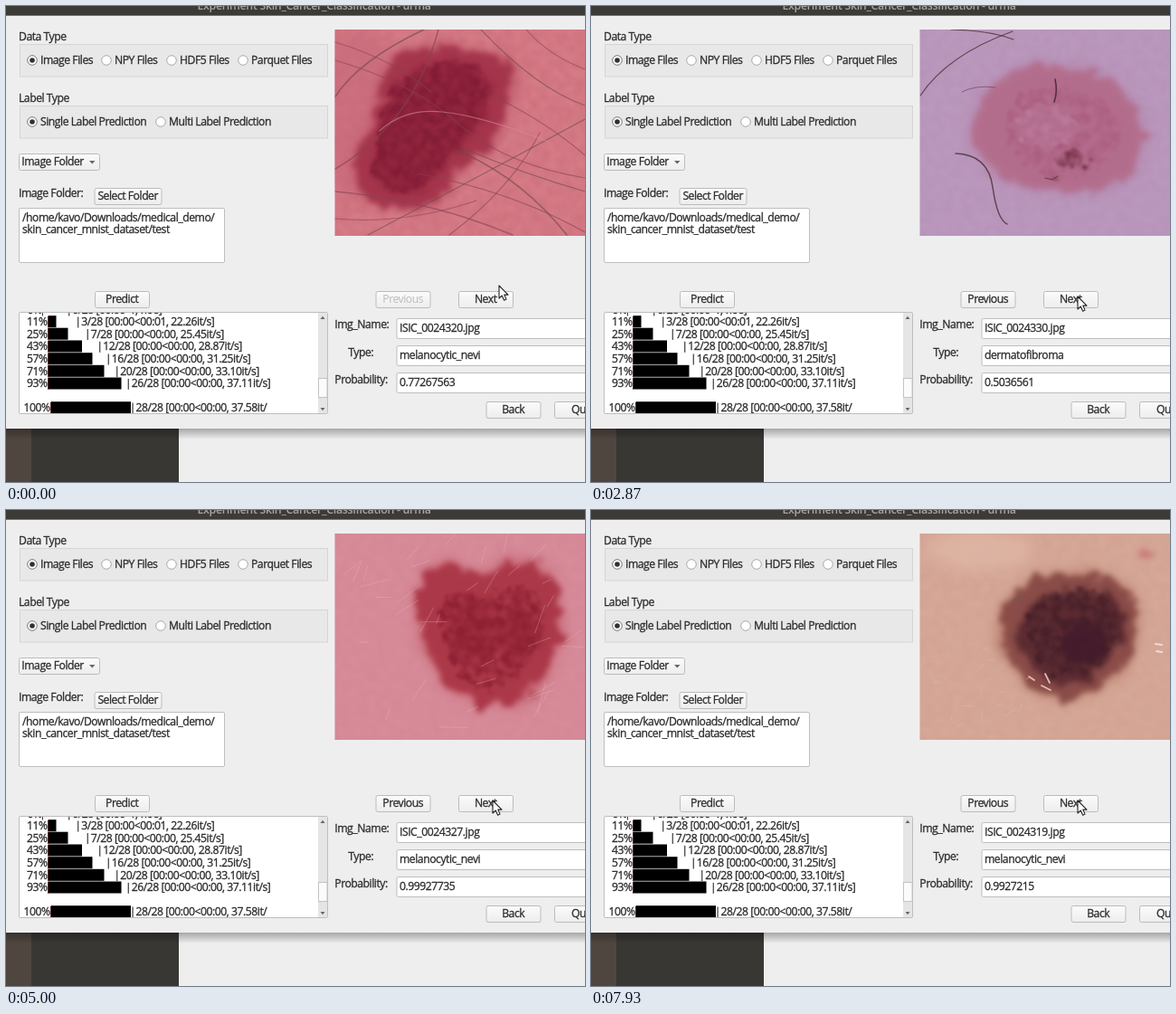
Animation of 640x526 px, one loop 8000 ms. Source, as an HTML page:

```html
<!DOCTYPE html>
<html lang="en">
<head>
<meta charset="utf-8">
<title>Skin lesion prediction</title>
<style>
html, body { margin: 0; width: 100%; height: 100%; overflow: hidden; background: #efeeef; }
svg { display: block; width: 100vw; height: 100vh; }
text {
  font: 12.2px "Open Sans", "Noto Sans", sans-serif; letter-spacing: -.47px; white-space: pre;
  fill: #2c2c2c; stroke: #2c2c2c; stroke-width: .3px;
}
.mid { text-anchor: middle; }
.end { text-anchor: end; }
.off { fill: #bcbbbc; stroke: none; }
.title { font-weight: 600; font-size: 12.4px; letter-spacing: -.3px; fill: #aaa69e; stroke: none; }
.hair { fill: none; stroke-linecap: round; }
</style>
</head>
<body>
<svg id="stage" viewBox="0 0 640 526" preserveAspectRatio="none" xmlns="http://www.w3.org/2000/svg">
  <defs>
    <clipPath id="photoClip"><rect x="363.5" y="26" width="277" height="228"/></clipPath>
    <clipPath id="logClip"><rect x="15" y="339" width="330" height="111"/></clipPath>
    <linearGradient id="shade" x2="0" y2="1">
      <stop stop-color="#000" stop-opacity=".3"/><stop offset="1" stop-color="#000" stop-opacity="0"/>
    </linearGradient>
    <linearGradient id="face" x2="0" y2="1">
      <stop stop-color="#fbfbfb"/><stop offset="1" stop-color="#ededed"/>
    </linearGradient>
    <g id="filters"></g>
  </defs>
  <g id="back"></g>
  <g id="photos" clip-path="url(#photoClip)"></g>
  <g id="front"></g>
  <path id="cursor" d="M0 0V14L3.3 11L5.6 16.2L8 15.1L5.8 10.1H10Z" fill="#fff" stroke="#222" stroke-width="1.1" stroke-linejoin="round"/>
</svg>
<script>
const NS = "http://www.w3.org/2000/svg";
const $ = id => document.getElementById(id);
const LOOP = 8000;

function add(parent, tag, attrs, label) {
  const el = document.createElementNS(NS, tag);
  for (const k in attrs) el.setAttribute(k, attrs[k]);
  if (label !== undefined) el.textContent = label;
  parent.appendChild(el);
  return el;
}
const back = $("back"), front = $("front");
const box = (x, y, width, height, fill, extra = {}) =>
  add(back, "rect", { x, y, width, height, fill, ...extra });
const say = (x, y, label, cls = "", parent = front) =>
  add(parent, "text", { x, y, class: cls }, label);

// Soft organic filters: "edge" and "halo" roughen outlines, "mottle" also breaks the fill up.
function makeFilter(id, freq, scale, blur, patchy) {
  const f = add($("filters"), "filter", {
    id, filterUnits: "userSpaceOnUse", x: 330, y: -10, width: 350, height: 300,
    "color-interpolation-filters": "sRGB"
  });
  add(f, "feTurbulence", { type: "fractalNoise", baseFrequency: freq, numOctaves: 3, seed: 7, result: "n" });
  add(f, "feDisplacementMap", {
    in: "SourceGraphic", in2: "n", scale, xChannelSelector: "R", yChannelSelector: "G", result: "d"
  });
  if (patchy) {
    add(f, "feColorMatrix", { in: "n", values: "0 0 0 0 0  0 0 0 0 0  0 0 0 0 0  2.6 0 0 0 -.8", result: "a" });
    add(f, "feComposite", { in: "d", in2: "a", operator: "in" });
  }
  add(f, "feGaussianBlur", { stdDeviation: blur });
}
makeFilter("edge", .06, 26, 3);
makeFilter("halo", .03, 20, 8);
makeFilter("mottle", .1, 22, 1.4, true);

// Closed smooth curve through the midpoints of a few corner points.
function smooth(pts) {
  const n = pts.length / 2;
  const at = i => [pts[2 * (i % n)], pts[2 * (i % n) + 1]];
  const mid = i => { const a = at(i), b = at(i + 1); return [(a[0] + b[0]) / 2, (a[1] + b[1]) / 2]; };
  let d = "M" + mid(0);
  for (let i = 1; i <= n; i++) d += "Q" + at(i) + " " + mid(i);
  return d + "Z";
}

function random(seed) {
  return () => (seed = (seed * 16807) % 2147483647) / 2147483647;
}

function photo(light, dark) {
  const g = add($("photos"), "g", { display: "none" });
  const rect = (fill, extra) => add(g, "rect", { x: 345, y: 5, width: 320, height: 270, fill, ...extra });
  rect(light);
  rect(dark, { filter: "url(#mottle)", opacity: .25 });
  const api = {
    g,
    blob(pts, fill, filter = "edge", opacity = 1) {
      add(g, "path", { d: smooth(pts), fill, opacity, filter: `url(#${filter})` });
      return api;
    },
    spot(cx, cy, rx, ry, fill, filter = "edge", opacity = 1) {
      add(g, "ellipse", { cx, cy, rx, ry, fill, opacity, filter: `url(#${filter})` });
      return api;
    },
    hair(d, stroke, width = 1.2, opacity = .85) {
      add(g, "path", { class: "hair", d, stroke, "stroke-width": width, opacity });
      return api;
    },
    streaks(seed, count, cx, cy, w, h, stroke, length, angle, spread) {
      const r = random(seed);
      let d = "";
      for (let i = 0; i < count; i++) {
        const a = angle + (r() - .5) * spread, l = length * (.4 + r());
        const x = cx + (r() - .5) * w, y = cy + (r() - .5) * h;
        d += `M${x.toFixed(1)} ${y.toFixed(1)}l${(l * Math.cos(a)).toFixed(1)} ${(l * Math.sin(a)).toFixed(1)}`;
      }
      return api.hair(d, stroke, .8, .4);
    }
  };
  return api;
}

function hairyMole() {
  const shape = [420, 58, 480, 40, 562, 62, 558, 110, 540, 155, 505, 172, 475, 222, 400, 224, 382, 165, 412, 120];
  const p = photo("#d67c87", "#b95a6a");
  p.spot(390, 120, 45, 95, "#c7687a", "halo", .6)
    .blob(shape, "#b94f62", "halo").blob(shape, "#a23249", "edge", .9)
    .blob([430, 75, 525, 55, 540, 110, 490, 165, 465, 205, 405, 205, 410, 135], "#851b35", "edge", .55)
    .blob([430, 75, 525, 55, 540, 110, 490, 165, 465, 205, 405, 205, 410, 135], "#771530", "mottle", .6);
  const lines = [
    "M364 100Q390 60 462 26", "M364 60Q450 85 500 130T640 190", "M364 235Q440 242 520 215",
    "M400 253Q520 190 640 125", "M364 180Q450 130 478 26", "M455 185Q560 205 640 250",
    "M500 155Q570 185 640 205", "M540 100Q600 130 640 165", "M364 205Q470 215 560 253",
    "M525 26Q585 90 640 110", "M575 26Q600 55 640 70", "M490 253Q560 200 590 140",
    "M500 160Q570 190 620 253", "M364 40Q430 60 470 95"
  ];
  lines.forEach((d, i) => p.hair(d, i % 3 ? "#854452" : "#6b4a46", i % 4 ? 1.1 : 1.6, .6));
  return p.hair("M413 138Q440 113 482 117T600 150", "#d08a98", 1.2, .6);
}

function diagonalMole() {
  const shape = [395, 198, 440, 150, 500, 82, 555, 68, 632, 106, 605, 158, 545, 200, 475, 226, 400, 228];
  const core = [425, 190, 475, 150, 515, 85, 560, 76, 612, 108, 580, 158, 535, 190, 460, 212];
  return photo("#e89dad", "#de8fa0")
    .spot(590, 42, 90, 25, "#f0aab8", "halo", .7)
    .blob(shape, "#d27480", "halo").blob(shape, "#cb6670", "edge", .75)
    .blob(core, "#b84a55", "edge", .7).blob(core, "#a4343f", "mottle", .65)
    .spot(549, 106, 20, 11, "#932b37", "edge", .7).spot(480, 180, 20, 13, "#9c323c", "edge", .6)
    .streaks(31, 60, 510, 155, 170, 100, "#a8434d", 15, -.6, 1.5)
    .spot(537, 216, 4, 4, "#a34858", "edge", .7);
}

function lilacPatch() {
  const shape = [424, 105, 470, 66, 535, 64, 590, 90, 616, 140, 602, 192, 545, 208, 480, 204, 424, 168];
  return photo("#bb98bd", "#ad88b0")
    .blob(shape, "#b482a6", "halo").blob(shape, "#b36a88", "edge", .85)
    .blob([455, 110, 500, 85, 570, 100, 595, 150, 540, 198, 465, 170], "#a7567a", "mottle", .6)
    .spot(505, 133, 35, 24, "#c085a6", "mottle", .7)
    .spot(528, 168, 15, 9, "#78354a", "mottle").spot(551, 174, 7, 4, "#703244", "mottle")
    .spot(510, 190, 9, 3, "#763848", "mottle")
    .hair("M364 99Q394 54 466 28", "#51343e").hair("M398 26Q440 27 467 37", "#51343e")
    .hair("M403 163Q439 164 444 200T460 241", "#51343e", 1.5)
    .hair("M410 95Q425 87 447 90", "#6c4457", .8)
    .hair("M513 81Q516 94 512 106", "#432532", 1.6).hair("M502 190l8 2 6-4", "#5a3040", 1);
}

function pinkPatch() {
  const shape = [422, 58, 490, 44, 545, 56, 608, 50, 616, 110, 602, 165, 616, 208, 550, 238, 500, 208, 420, 203, 416, 125];
  return photo("#c49bca", "#b88dbd")
    .blob(shape, "#c98da9", "halo", .8).blob(shape, "#c68299", "edge", .85)
    .blob(shape, "#b86f80", "mottle", .55)
    .spot(527, 132, 27, 34, "#a5719b", "edge", .8)
    .spot(581, 93, 22, 30, "#9b5867", "edge").spot(580, 88, 18, 23, "#673444", "mottle")
    .spot(438, 122, 9, 12, "#9a5264", "mottle").spot(485, 184, 22, 8, "#b5686a", "mottle")
    .hair("M549 26V61", "#62435a").hair("M570 112Q580 132 596 146", "#4d2937", 1.4)
    .hair("M466 193Q462 219 447 247", "#785063").hair("M442 80Q450 105 438 128", "#874859", 1)
    .hair("M370 251Q375 234 390 234Q388 244 376 246", "#73516e", 1);
}

function heartMole() {
  const shape = [454, 76, 480, 54, 525, 74, 558, 58, 598, 58, 617, 115, 610, 164, 575, 209, 535, 221, 488, 199, 460, 145];
  return photo("#d88c9a", "#cc7d8c")
    .blob(shape, "#c35e6c", "halo").blob(shape, "#ab3848")
    .blob([475, 90, 530, 95, 585, 80, 600, 125, 570, 185, 525, 203, 485, 165], "#8a1d30", "mottle", .85)
    .spot(515, 130, 25, 35, "#8c2033", "edge", .5).spot(565, 137, 22, 30, "#8c2033", "edge", .5)
    .streaks(83, 36, 495, 140, 255, 215, "#ecb9c4", 25, -.65, 1.4);
}

function paleCentre() {
  const p = photo("#d99a94", "#cb8880")
    .spot(515, 125, 84, 86, "#b87569", "halo", .8)
    .spot(514, 125, 68, 74, "#a2605a", "halo")
    .spot(517, 120, 59, 62, "#944d5c", "mottle", .8)
    .spot(515, 125, 42, 47, "#a5607a", "edge", .8)
    .spot(510, 128, 27, 35, "#c78bae", "mottle");
  const r = random(19);
  let d = "";
  for (let i = 0; i < 38; i++) {
    const a = r() * 6.28, l = 18 + r() * 28;
    const x = 511 + 7 * Math.cos(a), y = 130 + 9 * Math.sin(a);
    d += `M${x} ${y}L${511 + l * Math.cos(a)} ${130 + l * Math.sin(a)}`;
  }
  return p.hair(d, "#d5a0c6", 1, .45);
}

function darkMole() {
  const shape = [456, 103, 488, 77, 535, 68, 595, 80, 608, 124, 590, 174, 550, 204, 508, 216, 473, 182, 451, 145];
  return photo("#d6a898", "#ca9889")
    .spot(430, 45, 60, 22, "#e1b9a8", "halo", .7)
    .blob(shape, "#b27564", "halo").blob(shape, "#8a4c48")
    .blob([472, 110, 525, 82, 582, 95, 593, 130, 560, 185, 510, 197, 473, 155], "#57282f", "edge", .9)
    .blob([470, 115, 525, 85, 585, 95, 585, 165, 515, 198], "#3c1a25", "mottle", .65)
    .spot(546, 148, 27, 23, "#421a2c", "edge", .8)
    .spot(615, 50, 6, 5, "#c76e70", "edge", .8)
    .hair("M464 103Q470 96 478 95", "#775853", 1.3)
    .hair("M624 148l7 1M625 156l6 1", "#f8e6df", 2)
    .hair("M484 184l6 4M502 181l5 10M498 194l10 5", "#edd2ca", 1.8)
    .streaks(47, 18, 430, 195, 110, 90, "#e8c7ba", 8, -.5, 2);
}

const NEVI = "melanocytic_nevi", FIBROMA = "dermatofibroma";
const scenes = [
  { from: 0, draw: hairyMole, id: 20, type: NEVI, prob: "0.77267563" },
  { from: 870, draw: diagonalMole, id: 11, type: NEVI, prob: "0.9960624" },
  { from: 2870, draw: lilacPatch, id: 30, type: FIBROMA, prob: "0.5036561" },
  { from: 3740, draw: pinkPatch, id: 12, type: "benign_keratosis_like_lesions", prob: "0.9563977" },
  { from: 4600, draw: heartMole, id: 27, type: NEVI, prob: "0.99927735" },
  { from: 6540, draw: paleCentre, id: 18, type: FIBROMA, prob: "1.0" },
  { from: 7400, draw: darkMole, id: 19, type: NEVI, prob: "0.9927215" }
];
scenes.forEach(s => s.layer = s.draw().g);

function button(x, y, w, label, h = 18) {
  box(x + .5, y + .5, w - 1, h, "url(#face)", { rx: 2, stroke: "#bdbcbd" });
  return say(x + w / 2 - .3, y + 13.3, label, "mid");
}

function radio(x, y, label, on) {
  add(front, "circle", { cx: x, cy: y, r: 5.3, fill: "#fff", stroke: on ? "#777" : "#aaa" });
  if (on) add(front, "circle", { cx: x, cy: y, r: 2.8, fill: "#303030" });
  say(x + 9, y + 4.2, label);
}

const field = (x, y, w, h) => box(x + .5, y + .5, w, h, "#fff", { rx: 1.5, stroke: "#bfbebf" });

// Window and desktop
box(0, 0, 640, 526, "#efeeef");
box(0, 467, 28, 59, "#4f4640");
box(28, 467, 163, 59, "#393734");
box(0, 467, 640, 12, "url(#shade)");
box(0, 0, 640, 10, "#3d3b37");
box(0, 10, 640, 1, "#77756f");
say(340.5, 3.5, "Experiment Skin_Cancer_Classification - urma", "title mid");

// Options
for (const y of [42.5, 110.5]) box(15.5, y, 340, 35.5, "#e9e8e9", { stroke: "#d6d5d6" });
say(14, 37.5, "Data Type");
radio(29, 60, "Image Files", true);
radio(111, 60, "NPY Files");
radio(183, 60, "HDF5 Files");
radio(262, 60, "Parquet Files");
say(14, 105.7, "Label Type");
radio(29, 128, "Single Label Prediction", true);
radio(171, 128, "Multi Label Prediction");
button(14, 163, 90, "");
say(17.3, 176.3, "Image Folder");
add(front, "path", { d: "M92 171h6.5l-3.2 3.6z", fill: "#666" });
say(14, 211, "Image Folder:");
button(97.5, 201, 75, "Select Folder");
field(14, 223, 227, 60);
say(18, 237.5, "/home/kavo/Downloads/medical_demo/");
say(18, 250.7, "skin_cancer_mnist_dataset/test");
button(98, 315, 61, "Predict");
const previous = button(408.5, 315, 61, "Previous");
button(500, 315, 61, "Next");
button(530.5, 437, 61, "Back");
button(606, 437, 61, "Quit");

// Log
field(14, 338, 341, 112);
box(345, 339, 10, 111, "#e6e5e6");
box(345.5, 411.5, 9.5, 21, "#fbfbfb", { stroke: "#c4c3c4" });
add(front, "path", { d: "M347.5 346h5l-2.5-3.2zM347.5 444h5l-2.5 3.2z", fill: "#666" });
const log = add(front, "g", { "clip-path": "url(#logClip)" });

function logRow(y, pct, x, end, bar, label) {
  say(x - 1.5, y, pct + "%", "end", log);
  add(log, "rect", { x: x - 1, y: y - 10.5, width: 1, height: 13, fill: "#5a2a2a" });
  add(log, "rect", { x, y: y - 10.8, width: end - x, height: 13, fill: "#000" });
  add(log, "rect", { x: bar + 1.2, y: y - 9.5, width: 1.1, height: 12, fill: "#2c2c2c" });
  say(bar + 5.3, y, label, "", log);
}
logRow(340, 0, 41, 41, 68, "0/28 [00:00<?, ?it/s]");
logRow(353, 11, 47, 55.5, 78, "3/28 [00:00<00:01, 22.26it/s]");
logRow(366.5, 25, 47, 68.5, 88.5, "7/28 [00:00<00:00, 25.45it/s]");
logRow(380.3, 43, 47, 84, 102, "12/28 [00:00<00:00, 28.87it/s]");
logRow(394, 57, 47, 95.5, 111.5, "16/28 [00:00<00:00, 31.25it/s]");
logRow(407.6, 71, 47, 108.5, 121, "20/28 [00:00<00:00, 33.10it/s]");
logRow(421.3, 93, 47, 127.5, 133.5, "26/28 [00:00<00:00, 37.11it/s]");
logRow(448, 100, 50, 138, 138.3, "28/28 [00:00<00:00, 37.58it/");

// Results
say(363.3, 356, "Img_Name:");
say(378.3, 387, "Type:");
say(363.3, 417, "Probability:");
const [nameText, typeText, probText] = [345, 375, 405].map(y => {
  field(431.5, y, 220, 22);
  return say(435, y + 15, "");
});

let shown = -1;
function render(ms) {
  const t = ms % LOOP;
  let now = 0;
  scenes.forEach((s, i) => { if (t >= s.from) now = i; });
  if (now !== shown) {
    const s = scenes[now];
    scenes.forEach((o, i) => o.layer.setAttribute("display", i === now ? "inline" : "none"));
    nameText.textContent = `ISIC_00243${s.id}.jpg`;
    typeText.textContent = s.type;
    probText.textContent = s.prob;
    previous.setAttribute("class", now ? "mid" : "mid off");
    shown = now;
  }
  const u = Math.min(1, Math.max(0, (t - 70) / 460));
  const k = u * u * (3 - 2 * u);
  $("cursor").setAttribute("transform", `translate(${545 - 7 * k} ${309 + 12 * k})`);
}

const start = performance.now();
function tick() {
  render(performance.now() - start);
  requestAnimationFrame(tick);
}
tick();
</script>
</body>
</html>
```
